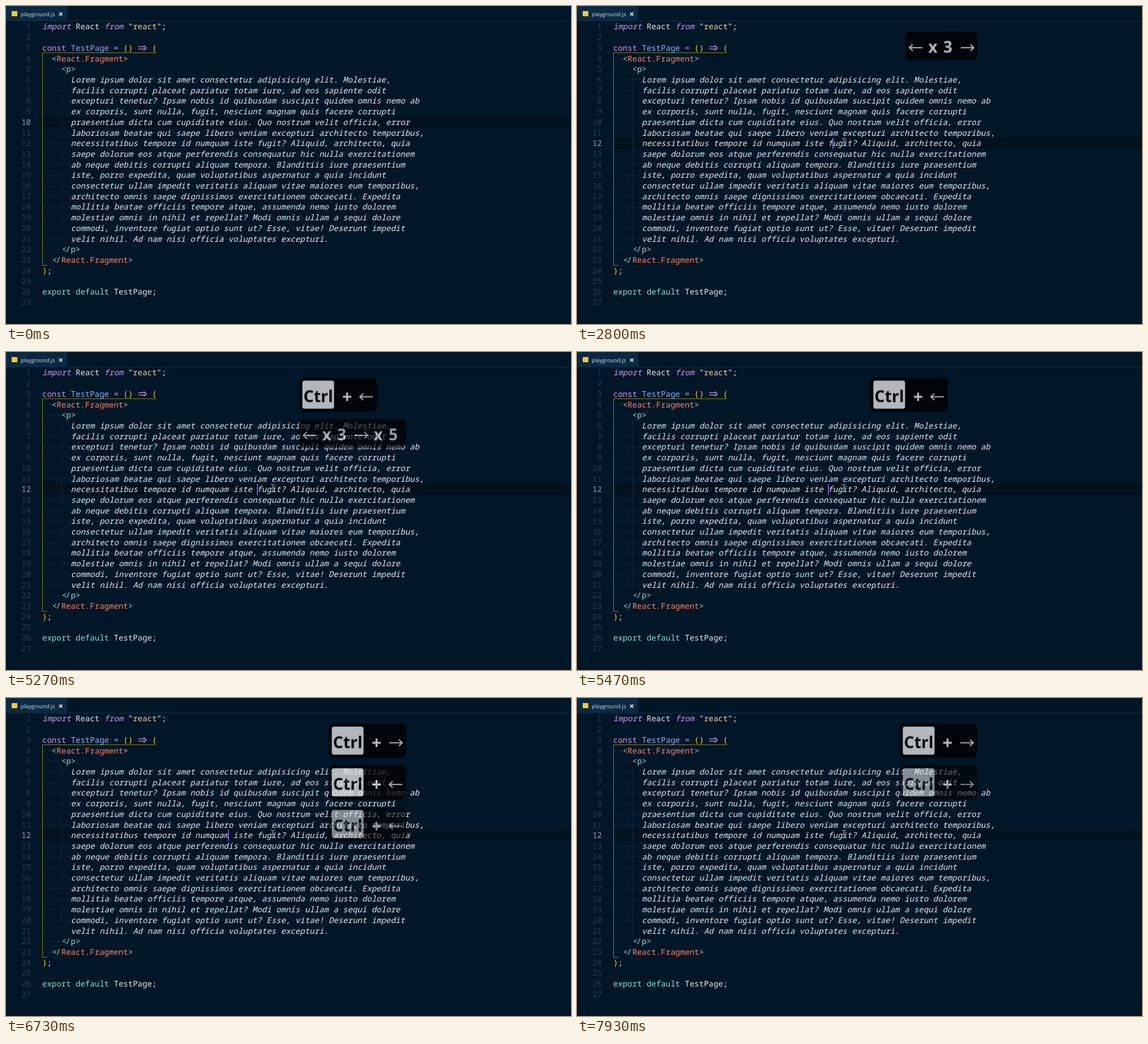
Animation of 998 by 561 pixels, one loop 8 s. Source, as an HTML page with a canvas:

```html
<!DOCTYPE html>
<html lang="en">
<head>
<meta charset="utf-8">
<title>Caret movement</title>
<style>
html, body { margin: 0; width: 100%; height: 100%; overflow: hidden; background: #011627; }
canvas { display: block; }
</style>
</head>
<body>
<canvas id="stage" width="998" height="561"></canvas>
<script>
const W = 998, H = 561, LOOP = 8000;
const LEFT = 64, COL = 8.43, ROW = 18.71, BASE = 41.4;
const ctx = document.getElementById('stage').getContext('2d');
const layer = document.createElement('canvas');
layer.width = W;
layer.height = 80;
const pop = layer.getContext('2d');

const MONO = '14.05px "Noto Sans Mono", "DejaVu Sans Mono", monospace';
const SANS = '"Open Sans", "Noto Sans", sans-serif';
const BG = '#011627', FG = '#e2eaf6', VIOLET = '#cd98f0', TEAL = '#84e4d4', CORAL = '#fb8368',
      GOLD = '#ffd700', BLUE = '#88b0ff', DIM = '#263f53', DOT = '#2f4a5f', SCOPE = '#8c801d';

const prose = `Lorem ipsum dolor sit amet consectetur adipisicing elit. Molestiae,
facilis corrupti placeat pariatur totam iure, ad eos sapiente odit
excepturi tenetur? Ipsam nobis id quibusdam suscipit quidem omnis nemo ab
ex corporis, sunt nulla, fugit, nesciunt magnam quis facere corrupti
praesentium dicta cum cupiditate eius. Quo nostrum velit officia, error
laboriosam beatae qui saepe libero veniam excepturi architecto temporibus,
necessitatibus tempore id numquam iste fugit? Aliquid, architecto, quia
saepe dolorum eos atque perferendis consequatur hic nulla exercitationem
ab neque debitis corrupti aliquam tempora. Blanditiis iure praesentium
iste, porro expedita, quam voluptatibus aspernatur a quia incidunt
consectetur ullam impedit veritatis aliquam vitae maiores eum temporibus,
architecto omnis saepe dignissimos exercitationem obcaecati. Expedita
mollitia beatae officiis tempore atque, assumenda nemo iusto dolorem
molestiae omnis in nihil et repellat? Modi omnis ullam a sequi dolore
commodi, inventore fugiat optio sunt ut? Esse, vitae! Deserunt impedit
velit nihil. Ad nam nisi officia voluptates excepturi.`.split('\n');

// Each line is a list of [text, colour, italic]
const lines = [
  [['import', VIOLET, 1], [' React ', FG], ['from', VIOLET, 1],
    [' "', '#d9f5dd'], ['react', '#f0d2a8'], ['"', '#d9f5dd'], [';', FG]],
  [],
  [['const ', VIOLET], ['TestPage ', BLUE], ['= ', VIOLET], ['() ', GOLD], ['=> ', VIOLET], ['(', GOLD]],
  [['  <', TEAL], ['React.Fragment', CORAL], ['>', TEAL]],
  [['    <p>', TEAL]],
  ...prose.map(text => [['      ' + text, FG, 1]]),
  [['    </', TEAL], ['p>', TEAL]],
  [['  </', TEAL], ['React.Fragment', CORAL], ['>', TEAL]],
  [[')', GOLD], [';', FG]],
  [],
  [['export default', TEAL], [' TestPage;', FG]],
  []
];

// Caret columns by time; the first one is the mouse click
const carets = [[930, 48], [1730, 47], [2130, 46], [2470, 45], [2800, 46], [3200, 47], [3600, 48],
  [4000, 49], [4400, 50], [5270, 45], [5730, 40], [6070, 32], [6530, 39], [6930, 44], [7400, 50]];
const chords = carets.slice(9).map(([time], i) => ({ time, dir: i < 3 ? -1 : 1, fade: time + 950 }));
const FADE = 180, CLICK = 930, BLINK = 470;

const colX = col => LEFT + col * COL;
const rowTop = line => 27.2 + (line - 1) * ROW;

function stroke(c, color, width, ...paths) {
  c.strokeStyle = color;
  c.lineWidth = width;
  c.beginPath();
  for (const [x, y, ...rest] of paths) {
    c.moveTo(x, y);
    for (let i = 0; i < rest.length; i += 2) c.lineTo(rest[i], rest[i + 1]);
  }
  c.stroke();
}

function drawWord(word, x, y) {
  if (word === '=>') {
    const m = y - 4.9;
    stroke(ctx, VIOLET, 1.3, [x + 1, m - 2, x + 13, m - 2], [x + 1, m + 2, x + 13, m + 2],
      [x + 10.5, m - 4.5, x + 15.5, m, x + 10.5, m + 4.5]);
  } else if (word === '</') {
    ctx.fillText('<', x + 1, y);
    ctx.fillText('/', x + 7.5, y);
  } else {
    ctx.fillText(word, x, y);
  }
}

function drawCode(active) {
  ctx.fillStyle = '#01111d';
  ctx.fillRect(LEFT, rowTop(active), W - LEFT, ROW);
  ctx.fillStyle = '#0e2b40';
  ctx.fillRect(98, rowTop(6), 1, ROW * 16);
  stroke(ctx, SCOPE, 1, [265, 82.5, 64.5, 82.5, 64.5, 457.5, 73, 457.5]);

  lines.forEach((segments, i) => {
    const y = BASE + i * ROW;
    ctx.font = MONO;
    ctx.textAlign = 'right';
    ctx.fillStyle = i + 1 === active ? '#8fa0ae' : DIM;
    ctx.fillText(i + 1, 44, y);
    ctx.textAlign = 'left';
    let col = 0;
    for (const [text, color, italic] of segments) {
      ctx.font = (italic ? 'italic ' : '') + '500 ' + MONO;
      for (const { 0: part, index } of text.matchAll(/\S+|\s/g)) {
        const x = colX(col + index);
        if (part === ' ') {
          ctx.fillStyle = DOT;
          ctx.fillRect(x + 3.5, y - 5.3, 1.5, 1.5);
        } else {
          ctx.fillStyle = color;
          drawWord(part, x, y);
        }
      }
      col += text.length;
    }
  });
}

function drawTab() {
  ctx.fillStyle = '#0b2942';
  ctx.fillRect(0, 0, 108, 27);
  ctx.fillStyle = '#1a3448';
  ctx.fillRect(108, 26, W - 108, 1);
  ctx.fillStyle = '#ffca28';
  ctx.fillRect(10, 9, 10, 9);
  ctx.fillStyle = '#d2dee7';
  ctx.font = '9.6px ' + SANS;
  ctx.fillText('playground.js', 26, 17.6);
  stroke(ctx, '#ffffff', 1.5, [94, 11.5, 99.5, 17], [99.5, 11.5, 94, 17]);
}

function drawCaret(time) {
  const last = carets.filter(([t]) => t <= time).pop();
  if (!last || time - last[0] >= BLINK) return;
  ctx.fillStyle = '#7e57c2';
  ctx.fillRect(Math.floor(colX(last[1])), 233, 2, 19);
}

function drawMouse(time) {
  if (time < 330) return;
  const p = Math.min(1, Math.floor((time - 330) / 66.7) / 8);
  const ease = p * p * (3 - 2 * p);
  const x = Math.round(934 - 463 * ease) + 0.5, y = Math.round(525 - 285 * ease);
  stroke(ctx, '#d5d9dd', 1, [x, y - 5.5, x, y + 5.5],
    [x - 3, y - 6.5, x - 1, y - 6.5, x, y - 5.5, x + 1, y - 6.5, x + 3, y - 6.5],
    [x - 3, y + 6.5, x - 1, y + 6.5, x, y + 5.5, x + 1, y + 6.5, x + 3, y + 6.5]);
}

function drawArrow(x, y, dir) {
  const tip = dir < 0 ? x : x + 23, tail = dir < 0 ? x + 23 : x;
  stroke(pop, '#eeeeee', 2, [tail, y, tip, y], [tip - dir * 6, y - 5.5, tip, y, tip - dir * 6, y + 5.5]);
}

function box(x, y, w, h, r, color) {
  pop.fillStyle = color;
  pop.beginPath();
  pop.roundRect(x, y, w, h, r);
  pop.fill();
}

function popup(x, y, alpha, paint) {
  if (alpha <= 0) return;
  pop.clearRect(0, 0, W, 80);
  paint();
  ctx.globalAlpha = 0.75 * alpha;
  ctx.drawImage(layer, x, y);
  ctx.globalAlpha = 1;
}

function paintChord(dir) {
  box(0, 0, 137, 61, 9, '#000');
  box(5.5, 6, 56, 49.5, 4, '#eeeeee');
  pop.fillStyle = '#000';
  pop.font = 'bold 28.5px ' + SANS;
  pop.fillText('Ctrl', 7.5, 43.5);
  stroke(pop, '#eeeeee', 3.4, [77, 34.5, 92, 34.5], [84.5, 27, 84.5, 42]);
  drawArrow(107, 34.5, dir);
}

function paintArrows(width, groups) {
  box(0, 0, width, 50.5, 9, '#000');
  pop.font = 'bold 28px ' + SANS;
  let x = 7;
  for (const [dir, count] of groups) {
    drawArrow(x, 29, dir);
    if (count > 1) {
      pop.fillStyle = '#eeeeee';
      pop.fillText('x', x + 33.5, 38);
      pop.fillText(count, x + 60, 38);
    }
    x += 91;
  }
}

const fadeAt = (time, start) => Math.max(0, Math.min(1, 1 - (time - start) / FADE));

function drawPopups(time) {
  const presses = carets.slice(1, 9).filter(([t]) => t <= time).length;
  const groups = [[-1, Math.min(3, presses)], [1, presses - 3]].filter(g => g[1] > 0);
  const stack = chords.filter(c => c.time <= time).reverse();
  if (presses) {
    const lastCount = groups[groups.length - 1][1];
    const width = (groups.length - 1) * 91 + (lastCount > 1 ? 98 : 36);
    popup(707 - width, stack.length ? 118 : 44.5, fadeAt(time, 5240), () => paintArrows(width, groups));
  }
  const x = time < 6530 ? 518 : 570;
  stack.forEach((c, i) => popup(x, 44.5 + i * 73.5, fadeAt(time, c.fade), () => paintChord(c.dir)));
}

function render(time) {
  ctx.fillStyle = BG;
  ctx.fillRect(0, 0, W, H);
  drawCode(time < CLICK ? 10 : 12);
  drawTab();
  drawCaret(time);
  drawPopups(time);
  drawMouse(time);
}

ctx.textRendering = 'geometricPrecision';
const start = performance.now();
function tick() {
  render((performance.now() - start) % LOOP);
  requestAnimationFrame(tick);
}
tick();
</script>
</body>
</html>
```
